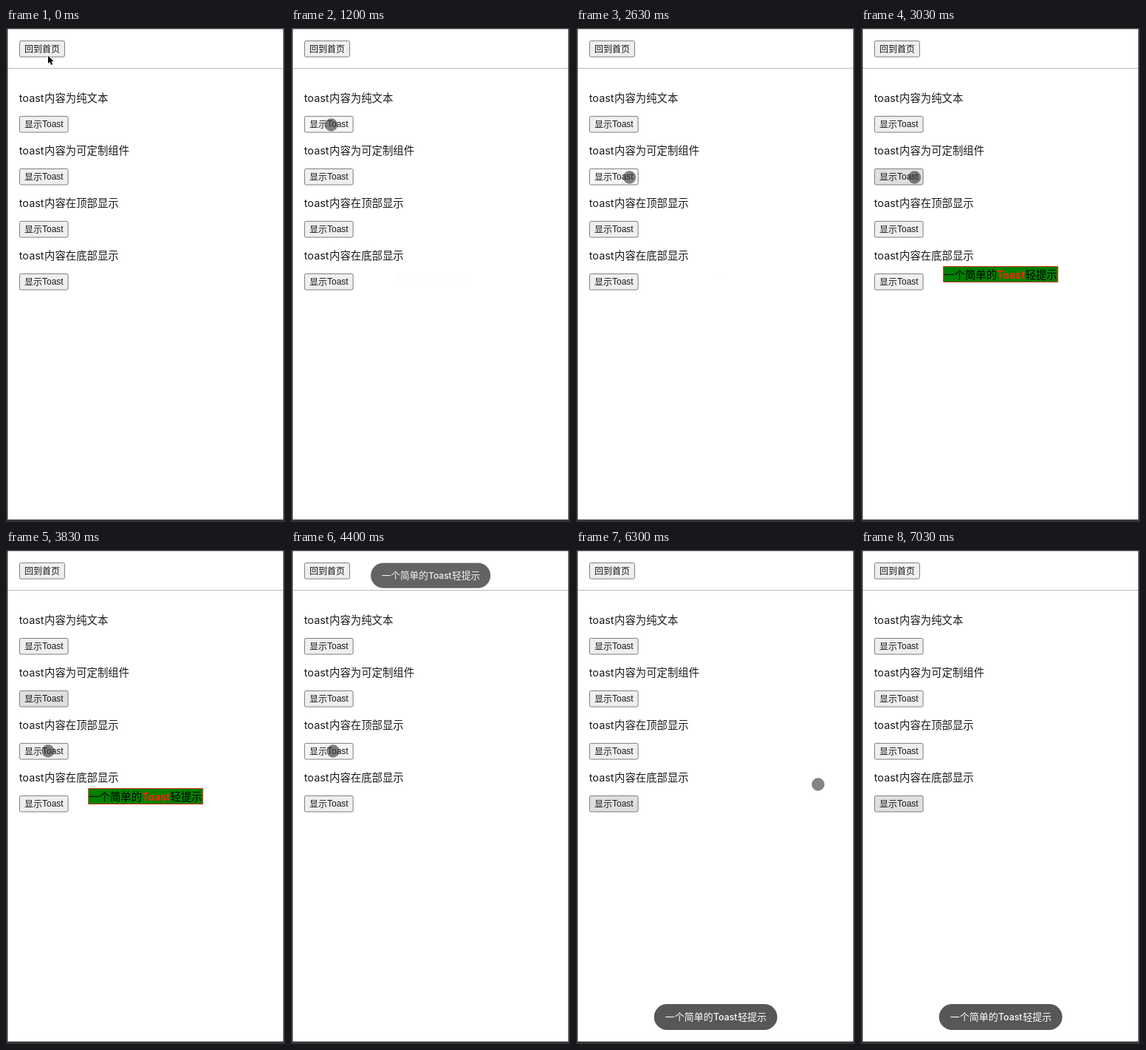
An HTML page with a canvas for the animation above (7510 ms loop, 378 by 668 pixels).

```html
<!DOCTYPE html>
<html lang="zh-CN">
<head>
<meta charset="utf-8">
<title>Toast</title>
<style>
  html, body { margin: 0; width: 100%; height: 100%; overflow: hidden; background: #fff; }
  canvas { display: block; width: 378px; height: 668px; }
</style>
</head>
<body>
<canvas id="stage"></canvas>
<script>
const W = 378, H = 668, LOOP = 7510;
const canvas = document.getElementById('stage');
const ctx = canvas.getContext('2d');
const dpr = window.devicePixelRatio || 1;
canvas.width = W * dpr;
canvas.height = H * dpr;

const CJK = '"Noto Sans CJK SC", "Noto Sans CJK", sans-serif';
const LATIN = 'Inter, "Noto Sans CJK SC", sans-serif';
const ARIAL = '"Liberation Sans", Arial, sans-serif';
const INK = '#1a1a1a';

const ROW = 71;    // distance between demos
const POP = 200;   // toast entrance
const PRESS = 200; // how long a button looks pressed
const MIDDLE = 333, TOP = 34.5, BOTTOM = 631.5;

// one entry per button: its title and the toast it opens
const DEMOS = [
  { title: '内容为纯文本', at: 1197, y: MIDDLE, rise: 7, paint: drawPill },
  { title: '内容为可定制组件', at: 2630, y: MIDDLE, rise: 0, paint: drawCustom },
  { title: '内容在顶部显示', at: 4265, y: TOP, rise: 0, paint: drawPill },
  { title: '内容在底部显示', at: 5567, y: BOTTOM, rise: 0, paint: drawPill }
];

const rowY = i => 131 + ROW * i;

// touch point: rests between eased moves, then leaves to the right
const ENTER = 30, EXIT = 7000;
const MOVES = [
  { from: 30, to: 230, x: 70, y: 122 },
  { from: 700, to: 830, x: 54.5, y: rowY(0) },
  { from: 1600, to: 2430, x: 72.5, y: rowY(1) },
  { from: 3150, to: 3850, x: 57, y: rowY(2) - 1 },
  { from: 4550, to: 5000, x: 52.5, y: rowY(3) + 2 },
  { from: 5900, to: 6300, x: 328, y: 317 },
  { from: 6330, to: 6530, x: 274, y: 307 },
  { from: 6770, to: EXIT, x: 362, y: 346 }
];

const clamp = v => Math.max(0, Math.min(1, v));
const mix = (a, b, p) => a + (b - a) * p;
const smooth = u => u * u * (3 - 2 * u);

// CSS "ease": cubic-bezier(.25, .1, .25, 1)
function ease(x) {
  x = clamp(x);
  let lo = 0, hi = 1;
  for (let i = 0; i < 24; i++) {
    const s = (lo + hi) / 2, r = 1 - s;
    if (0.75 * r * s + s * s * s < x) lo = s; else hi = s;
  }
  const r = 1 - lo;
  return 0.3 * r * r * lo + 3 * r * lo * lo + lo * lo * lo;
}

function text(str, x, y, font, color = INK) {
  ctx.font = font;
  ctx.fillStyle = color;
  ctx.fillText(str, x, y);
}

function roundBox(x, y, w, h, r) {
  ctx.beginPath();
  ctx.roundRect(x, y, w, h, r);
}

function outline(color, width) {
  ctx.strokeStyle = color;
  ctx.lineWidth = width;
  ctx.stroke();
}

function button(y, w, fill) {
  roundBox(18.4, y + 0.4, w - 1, 21.6, 2);
  ctx.fillStyle = fill;
  ctx.fill();
  outline('#7c7c7c', 1);
}

function drawPage(t, active) {
  ctx.fillStyle = '#fff';
  ctx.fillRect(0, 0, W, H);

  button(17, 62, '#efefef');
  text('回到首页', 25, 32.5, '12px ' + CJK);
  ctx.fillStyle = '#b9b9b9';
  ctx.fillRect(2, 54, 374, 1);

  DEMOS.forEach((demo, i) => {
    const y = i * ROW;
    text('toast', 17.8, 100 + y, '14.4px ' + LATIN);
    text(demo.title, 52, 100.3 + y, '14.4px ' + CJK);
    let fill = '#efefef';
    if (i === active) fill = t - demo.at < PRESS ? '#f6f6f6' : '#dfdfdf';
    button(119 + y, 66.7, fill);
    text('显示', 25, 134.5 + y, '12px ' + CJK);
    text('Toast', 49, 134.3 + y, '12px ' + ARIAL);
  });
}

// three runs of text with the Latin word in the middle
function message(x, wordX, endX, y, cjk, latin, color, wordColor) {
  text('一个简单的', x, y, cjk, color);
  text('Toast', wordX, y - 0.2, latin, wordColor);
  text('轻提示', endX, y, cjk, color);
}

function drawPill() {
  roundBox(-83.5, -17.5, 167, 35, 17.5);
  ctx.fillStyle = 'rgba(0,0,0,.66)';
  ctx.fill();
  message(-68.5, -3.3, 30, 4.8, '500 13px ' + CJK, '500 12.4px ' + LATIN, '#fff', '#fff');
}

function drawCustom() {
  ctx.beginPath();
  ctx.rect(-77.5, -10.5, 155, 21);
  ctx.fillStyle = '#008000';
  ctx.fill();
  outline('#d8301c', 1);
  message(-77, -5, 33.3, 5.8, '14.4px ' + CJK, 'bold 14px ' + LATIN, '#000', '#ff2010');
}

function drawToast(t, demo) {
  const p = ease((t - demo.at) / POP);
  const s = mix(0.58, 1, p);
  ctx.save();
  ctx.translate(189.2, demo.y + demo.rise * (1 - p));
  ctx.scale(s, s);
  ctx.globalAlpha = p;
  demo.paint();
  ctx.restore();
}

function drawArrow(x, y) {
  ctx.save();
  ctx.translate(x, y);
  ctx.fillStyle = '#000';
  ctx.lineJoin = 'round';
  const shape = new Path2D('M0 0V10.5L2.4 8.2L4.2 12.4L6 11.6L4.2 7.5H7.5Z');
  ctx.strokeStyle = '#fff';
  ctx.lineWidth = 1.6;
  ctx.stroke(shape);
  ctx.fill(shape);
  ctx.restore();
}

function drawTouch(t) {
  if (t >= EXIT) return;
  let x = 52, y = 58;
  for (const m of MOVES) {
    const p = smooth(clamp((t - m.from) / (m.to - m.from)));
    x = mix(x, m.x, p);
    y = mix(y, m.y, p);
  }
  ctx.beginPath();
  ctx.arc(x, y, 8.4, 0, Math.PI * 2);
  ctx.fillStyle = 'rgba(50,50,50,.6)';
  ctx.fill();
  outline('rgba(50,50,50,.25)', 1);
}

function drawFrame() {
  ctx.fillStyle = '#353535';
  ctx.fillRect(0, 0, W, 1.4);
  ctx.fillRect(0, 0, 2.4, H);
  ctx.fillRect(W - 2.4, 0, 2.4, H);
  ctx.fillRect(0, H - 3.4, W, 3.4);
}

function draw(t) {
  ctx.setTransform(dpr, 0, 0, dpr, 0, 0);
  const active = DEMOS.filter(d => d.at <= t).length - 1;
  drawPage(t, active);
  if (active >= 0) drawToast(t, DEMOS[active]);
  if (t < ENTER) drawArrow(57, 37.5); else drawTouch(t);
  drawFrame();
}

const start = performance.now();
function tick() {
  draw((performance.now() - start) % LOOP);
  requestAnimationFrame(tick);
}
tick();
</script>
</body>
</html>
```
